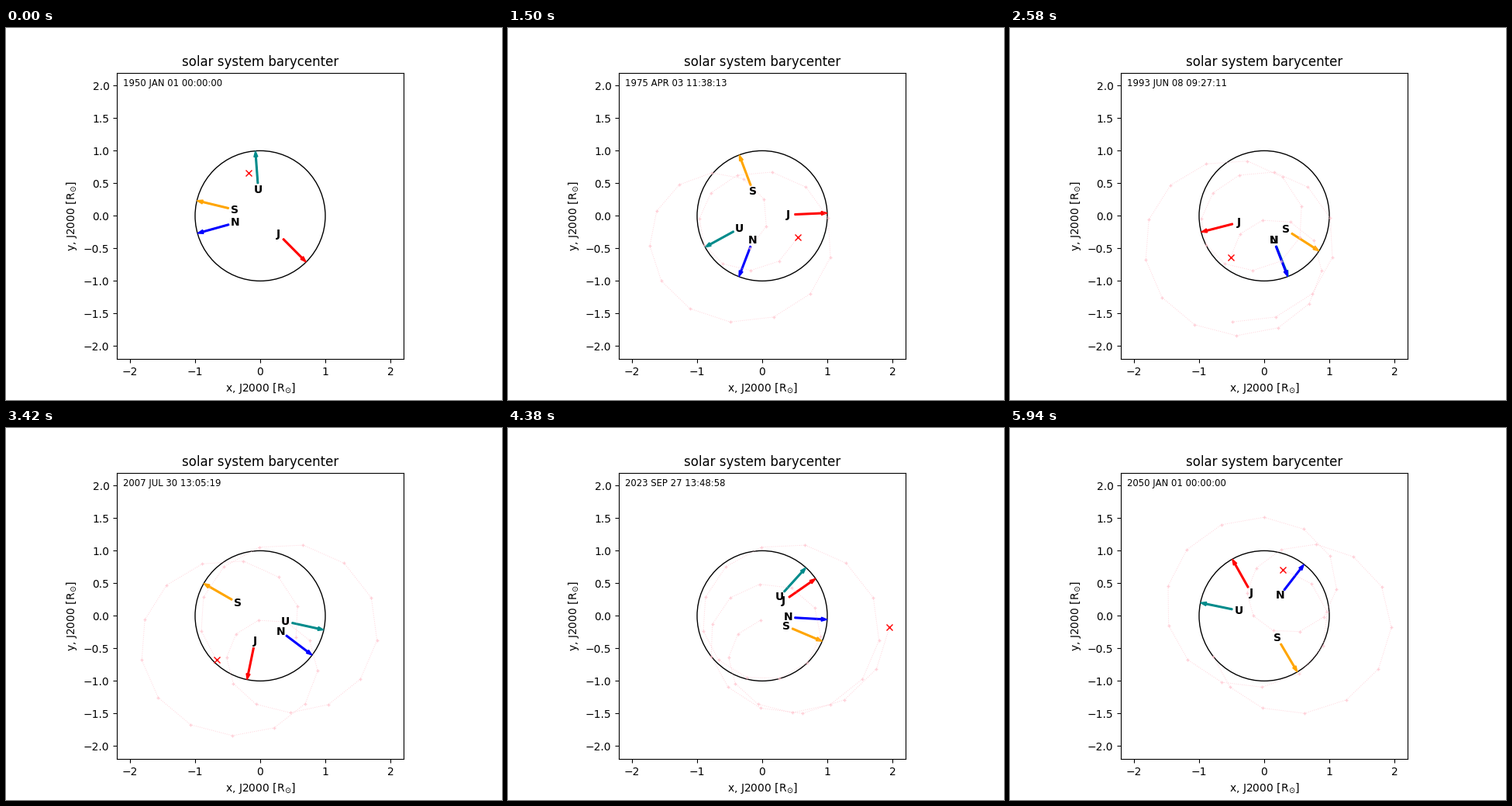
A matplotlib script for the animation above (6 s loop, 640 px wide and 480 px high).

```python
import numpy as np
import matplotlib.pyplot as plt
from matplotlib.animation import FuncAnimation

FRAMES = 100
TRAIL = FRAMES // 3
DAYS = 36525                    # 1950 to 2050
AU = 149597870.7 / 695700       # in solar radii
EARTH_RATE = 35999.05           # degrees per century
OBLIQUITY = np.radians(23.43928)
LEAP_SECONDS = 28
MONTHS = "JAN FEB MAR APR MAY JUN JUL AUG SEP OCT NOV DEC".split()

# label: colour, Sun/planet mass ratio, then the orbit at J2000:
# axis, eccentricity, inclination, mean longitude, perihelion, node
PLANETS = {
    "J": ("red", 1047.35, 5.2029, 0.04839, 1.304, 34.396, 14.73, 100.47),
    "S": ("orange", 3497.9, 9.5367, 0.05386, 2.486, 49.954, 92.6, 113.66),
    "U": ("darkcyan", 22903, 19.189, 0.04726, 0.773, 313.238, 170.95, 74.02),
    "N": ("blue", 19412, 30.07, 0.00859, 1.77, -55.12, 44.96, 131.78),
}


def orbit(t, ratio, a, e, *angles):
    """Equatorial x, y of a planet seen from the Sun, in AU."""
    inc, lon, peri, node = np.radians(angles)
    rate = EARTH_RATE * np.sqrt((1 + 1 / ratio) / a**3)
    mean = lon - peri + np.radians(rate) * t
    ecc = mean
    for _ in range(8):
        ecc = mean + e * np.sin(ecc)
    px = a * (np.cos(ecc) - e)
    py = a * np.sqrt(1 - e * e) * np.sin(ecc)
    w = peri - node
    u = px * np.cos(w) - py * np.sin(w)
    v = px * np.sin(w) + py * np.cos(w)
    x = u * np.cos(node) - v * np.cos(inc) * np.sin(node)
    y = u * np.sin(node) + v * np.cos(inc) * np.cos(node)
    z = v * np.sin(inc)
    return np.column_stack([x, y * np.cos(OBLIQUITY) - z * np.sin(OBLIQUITY)])


def date_text(i):
    part = i / (FRAMES - 1)
    # Leap seconds so far, from the years when their pace changed
    leaps = int(np.interp(1950 + 100 * part, [1972, 1980, 1988, 1999, 2006, 2017],
                          [2, 10, 15, 23, 24, LEAP_SECONDS], left=0))
    seconds = round(part * (DAYS * 86400 + LEAP_SECONDS) - leaps)
    stamp = np.datetime64("1950-01-01T00:00:00") + np.timedelta64(seconds, "s")
    day, clock = str(stamp).split("T")
    y, m, d = day.split("-")
    return f"{y} {MONTHS[int(m) - 1]} {d} {clock}"


centuries = np.linspace(-0.5, 0.5, FRAMES)
center = np.zeros((FRAMES, 2))
total = 1
directions = {}
for name, (_, ratio, *elements) in PLANETS.items():
    pos = orbit(centuries, ratio, *elements)
    directions[name] = pos / np.linalg.norm(pos, axis=1, keepdims=True)
    center += pos / ratio
    total += 1 / ratio
center *= AU / total

plt.rcParams["text.kerning_factor"] = 6
fig, ax = plt.subplots(figsize=(6.4, 4.8), dpi=100)
ax.set_aspect("equal")
ax.set_xlim(-2.2, 2.2)
ax.set_ylim(-2.2, 2.2)
ax.set_title("solar system barycenter")
ax.set_xlabel(r"x, J2000 [R$_{\odot}$]")
ax.set_ylabel(r"y, J2000 [R$_{\odot}$]")
ax.add_patch(plt.Circle((0, 0), 1, fill=False))

date = ax.text(0.02, 0.98, "", transform=ax.transAxes, va="top", fontsize="small")
trail, = ax.plot([], [], color="pink", ls=":", lw=0.7, marker="+", ms=3, alpha=0.7)
cross, = ax.plot([], [], "rx")
arrows, labels = {}, {}
for name, (color, *_) in PLANETS.items():
    arrows[name] = ax.arrow(0, 0.5, 0, 0.5, width=0.02, color=color,
                            length_includes_head=True)
    labels[name] = ax.text(0, 0, name, weight="bold", ha="center", va="center")


def update(i):
    date.set_text(date_text(i))
    trail.set_data(*center[max(0, i - TRAIL):i].T)
    # The cross lags one step behind the arrows and wraps at the start
    cross.set_data(*center[[i - 1]].T)
    for name, track in directions.items():
        x, y = track[i]
        arrows[name].set_data(x=x / 2, y=y / 2, dx=x / 2, dy=y / 2)
        labels[name].set_position((0.4 * x, 0.4 * y))
    return [date, trail, cross, *arrows.values(), *labels.values()]


anim = FuncAnimation(fig, update, frames=FRAMES, interval=60, repeat=True)
plt.show()
```
